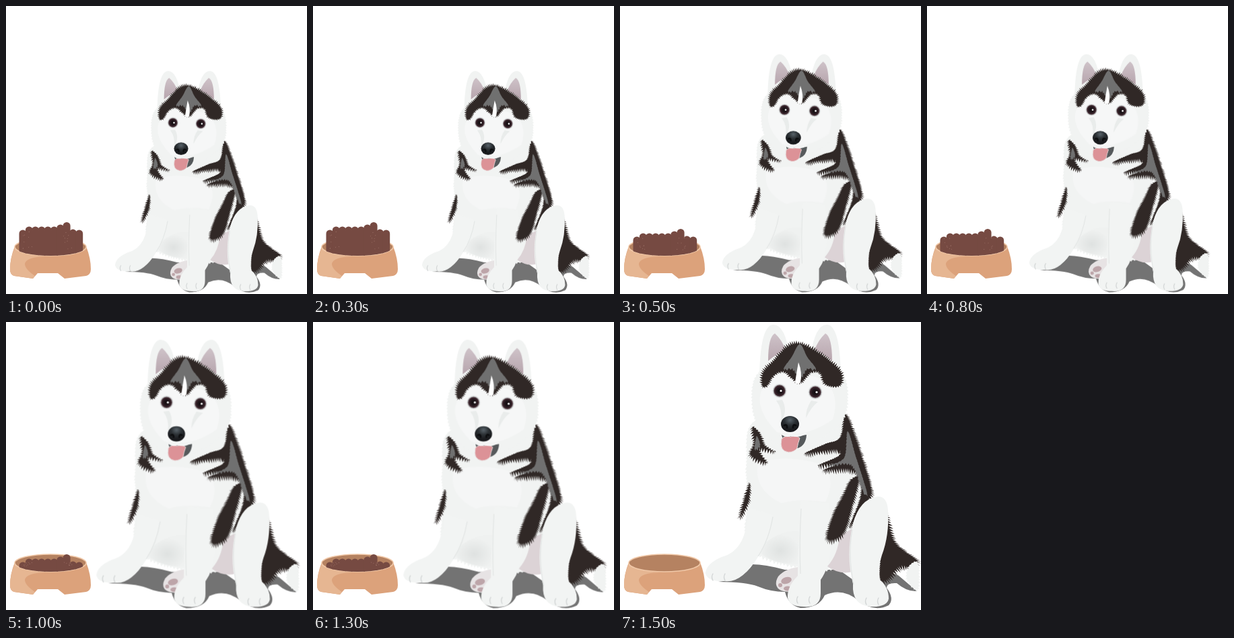
An HTML page for the animation above (2000 ms loop, 447 px wide and 429 px high).

```html
<!DOCTYPE html>
<html lang="en">
<head>
<meta charset="utf-8">
<title>Growing puppy</title>
<style>
html, body { margin: 0; width: 100%; height: 100%; overflow: hidden; background: #fff; }
svg { display: block; width: 447px; height: 429px; }
#dog { transform-origin: 0 0; animation: grow 2s step-end infinite; }
.food { visibility: hidden; animation: serve 2s step-end infinite; }
@keyframes grow {
  0% { transform: translate(62.8px, 93.7px) scale(.781); }
  25% { transform: translate(45.2px, 68.5px) scale(.84); }
  50% { transform: translate(14px, 22.7px) scale(.947); }
  75%, 100% { transform: none; }
}
@keyframes serve {
  0% { visibility: visible; }
  25%, 100% { visibility: hidden; }
}
</style>
</head>
<body>
<svg viewBox="0 0 447 429">
  <defs>
    <radialGradient id="noseFill" cx=".5" cy=".25" r=".6">
      <stop offset="0" stop-color="#59636a"/><stop offset=".5" stop-color="#2c3135"/><stop offset="1" stop-color="#191a1d"/>
    </radialGradient>
    <radialGradient id="eyeFill">
      <stop offset="0" stop-color="#120d10"/><stop offset=".55" stop-color="#21161b"/><stop offset="1" stop-color="#452a32"/>
    </radialGradient>
    <linearGradient id="earFill" x1="0" y1="0" x2="0" y2="1">
      <stop offset="0" stop-color="#cfc3c9"/><stop offset="1" stop-color="#b7a5ad"/>
    </linearGradient>
    <radialGradient id="bellyFill" cy=".6">
      <stop offset="0" stop-color="#dfe2e1"/><stop offset="1" stop-color="#eff1f0"/>
    </radialGradient>
    <clipPath id="inside"><path d="M13 300H119V359A53 13 0 0 1 13 359Z"/></clipPath>
  </defs>

  <path fill="#dca27b" d="M13 358Q6 376 6 392Q6 400 12 402L40 406L47 398H77L87 406L119 402Q126 400 126 392Q126 376 119 358Z"/>
  <path fill="#e6b692" d="M13 360Q6 376 6 392Q6 400 12 402L40 406L43 402Q28 392 28 384Q30 374 58 373Q22 370 13 360Z"/>
  <ellipse cx="66" cy="359" rx="53" ry="13" fill="#b58261" stroke="#f1c9a9" stroke-width="1.6"/>
  <g id="foods" clip-path="url(#inside)"></g>

  <g id="dog">
    <path fill="#737373" d="M146 387Q184 383 197 361Q215 361 245 369H325L346 384H388Q405 370 414 378L441 401Q426 402 411 389Q396 388 396 396Q408 412 399 422Q377 433 354 415Q330 395 304 407Q296 426 268 426Q250 422 245 402Q224 402 205 394Q187 387 146 387Z"/>
    <g id="tail"></g>
    <path fill="#e7e3e4" d="M272 364Q246 366 235 379Q228 391 236 398Q246 405 264 399Z"/>
    <g fill="#bda5a9">
      <ellipse cx="247" cy="385" rx="8" ry="5" transform="rotate(-16 247 385)"/>
      <circle cx="238" cy="392" r="3"/>
      <ellipse cx="249" cy="397" rx="6" ry="3.5"/>
    </g>
    <g id="body"></g>
    <path fill="#dcd3d6" d="M308 364Q324 346 326 318L345 308V372Q326 377 308 364Z"/>
    <path fill="url(#bellyFill)" d="M208 336Q236 308 268 312V360Q232 363 208 344Z"/>
    <path fill="#f5f6f6" d="M205 210Q250 195 305 214Q320 240 305 268Q265 262 240 270Q197 250 205 210Z"/>
    <path fill="#f2f4f3" d="M190 276Q190 340 151 350Q128 360 127 374Q129 387 155 386Q180 390 205 350Q222 325 227 288Z"/>
    <path fill="#f2f4f3" d="M269 266Q264 340 264 378Q248 394 249 411Q252 424 273 424Q298 426 298 404L298 384Q322 350 310 270Z"/>
    <g id="marks"></g>
    <path fill="#f2f4f3" d="M346 300Q356 264 382 260Q397 259 398 281Q400 318 389 347Q382 367 386 384Q399 395 399 412Q397 425 372 424Q344 422 346 390Q335 347 346 300Z"/>
    <path fill="none" stroke="#e2e5e4" stroke-width="1.2" d="M269 278Q266 330 268 375M227 290Q221 325 205 349M345 309Q338 347 347 391"/>
    <g id="toes" fill="none" stroke="#d3d6d6" stroke-width="1.4" stroke-linecap="round"></g>
    <g id="head">
      <g id="ear">
        <path fill="#f1f3f2" d="M207 90Q207 4 228 4Q245 4 252 50Z"/>
        <path fill="url(#earFill)" d="M220 58Q220 22 230 17Q241 27 246 42Q233 47 220 58Z"/>
      </g>
      <use href="#ear" transform="translate(535 0) scale(-1 1)"/>
    </g>
    <path fill="#f6f7f7" d="M220 86Q245 70 263 83Q283 75 306 89Q327 110 316 145Q276 174 233 164Q190 120 220 86Z"/>
    <path fill="#e9eceb" d="M241 116Q250 133 239 148Q242 130 232 117ZM284 117Q276 129 276 143Q285 125 294 119Z"/>
    <g id="mask"></g>
    <path fill="#fff" d="M265 60Q271 75 268 90Q264 94 260 90Q262 76 265 60Z"/>
    <g id="eyes"></g>
    <path fill="#55595b" d="M240 168Q258 172 277 168Q276 184 264 188H245Z"/>
    <path fill="#dc9297" stroke="#e9dcdc" d="M240 174Q246 168 253 171Q262 168 267 173Q264 181 263 188Q258 194 250 194Q236 192 240 174Z"/>
    <path fill="#f5f6f6" d="M236 163Q244 171 253 166Q263 171 278 163Q271 174 254 170Q243 174 236 163Z"/>
    <ellipse cx="252.5" cy="152" rx="13.5" ry="12" fill="url(#noseFill)"/>
    <path fill="none" stroke="#0d0e10" stroke-width="3" stroke-linecap="round" d="M244 154Q248 152 248 157M261 154Q257 152 257 157"/>
  </g>
</svg>
<script>
const $ = id => document.getElementById(id);
let seed = 7;
const rnd = () => (seed = seed * 16807 % 2147483647) / 2147483647;

function add(parent, tag, attrs) {
  const el = document.createElementNS('http://www.w3.org/2000/svg', tag);
  for (const k in attrs) el.setAttribute(k, attrs[k]);
  parent.append(el);
  return el;
}

// Clockwise spline outline; hair tips straddle it, pushed outward and along a lean.
function fur(id, fill, outline, len = 4, step = 4, lean = [0, 2]) {
  const pts = outline.split(' ').map(p => p.split(',').map(Number)), n = pts.length, out = [];
  pts.forEach((a, i) => {
    const b = pts[(i + 1) % n], z = pts[(i + n - 1) % n], c = pts[(i + 2) % n];
    const count = Math.max(1, Math.round(Math.hypot(b[0] - a[0], b[1] - a[1]) / step));
    const at = t => [0, 1].map(k => a[k] + .5 * t * (b[k] - z[k]
      + t * (2 * z[k] - 5 * a[k] + 4 * b[k] - c[k] + t * (3 * (a[k] - b[k]) + c[k] - z[k]))));
    for (let j = 0; j < count; j++) {
      const p = at(j / count), q = at((j + .5) / count);
      const dx = q[0] - p[0], dy = q[1] - p[1], d = Math.hypot(dx, dy) || 1;
      const push = ([x, y], h) => out.push([x + h * (len * dy / d + lean[0]), y + h * (lean[1] - len * dx / d)]);
      push(p, -.4);
      push(q, .4 + .5 * rnd());
    }
  });
  add($(id), 'path', { fill, d: 'M' + out.map(p => p.map(v => v.toFixed(1))).join('L') + 'Z' });
}

const white = '#f1f3f2', black = '#302826', grey = '#707070';

fur('tail', black, '394,284 407,325 424,342 443,357 432,367 416,366 397,386 386,383 388,340', 4, 3, [2, 3]);
fur('tail', white, '429,364 442,358 444,385 441,400 426,384', 2, 4, [0, 1]);

fur('body', white, '204,145 330,140 361,216 369,262 345,325 330,357 303,369 232,358 188,330 190,262 188,210', 2, 5);

// Shoulder and flank patches
fur('marks', black, '196,156 208,166 215,184 230,194 206,190 218,211 193,199 199,181', 4, 3);
fur('marks', grey, '203,170 208,184 200,190', 1);
fur('marks', black, '193,240 191,269 178,292 185,261', 4, 3, [-1, 3]);
fur('marks', black, '335,137 350,172 361,205 373,245 371,264 341,306 357,262 356,234 340,221 301,222 319,213 294,214 324,200 322,192 274,197 304,182 327,172', 4, 2.8, [1, 3]);
fur('marks', black, '355,233 345,275 331,317 307,325 316,288 330,261 342,236', 4, 2.8, [-1, 3]);
fur('marks', grey, '338,163 350,200 367,255 360,250 343,213 308,215 333,202', 1);

fur('head', white, '209,72 265,34 325,70 338,110 326,152 270,187 237,184 203,151 196,105', 2, 5, [0, 1]);
fur('mask', black, '267,31 295,45 314,59 329,75 328,94 312,96 302,90 297,76 284,75 268,91 255,84 246,75 236,75 226,83 219,95 211,96 212,75 228,57 247,37', 4, 3, [0, -1]);
fur('mask', grey, '267,33 278,52 291,70 278,70 267,84 256,70 243,70 255,52', 1, 5);

for (const [cx, cy] of [[237, 102.5], [290, 104.5]]) {
  const dot = (d, r, fill) => add($('eyes'), 'circle', { cx: cx + d, cy, r, fill });
  dot(0, 10.5, '#dcdfdf');
  dot(0, 9.3, '#928d90');
  dot(0, 8.3, 'url(#eyeFill)');
  dot(2, 1.6, '#fff');
}

// Two toe lines per paw
for (const [x, y] of [[147, 375], [273, 409], [375, 411]])
  for (const dx of [-9, 9]) add($('toes'), 'path', { d: `M${x + dx} ${y}q-3 5 0 10` });

// Kibble columns under a bumpy profile; each heap is lower than the last
[334, 344, 358].forEach((top, i) => {
  const g = add($('foods'), 'g', { class: 'food', style: `animation-delay:${i / 2 - 2}s` });
  for (let x = 25; x < 112; x += 9.3) {
    const y = top - 7 * Math.exp(-(((x - 88) / 8) ** 2)) + (x < 30 || x > 95 ? 5 : 0);
    add(g, 'path', { d: `M${x} ${y}V376`, stroke: '#764a42', 'stroke-width': 11, 'stroke-linecap': 'round' });
  }
  for (let j = 0; j < 18; j++) {
    const x = (j % 2 ? 25 : 84) + 14 * rnd();
    add(g, 'circle', { cx: x, cy: top + (364 - top) * rnd(), r: .55, fill: '#9c7066' });
  }
});
</script>
</body>
</html>
```
